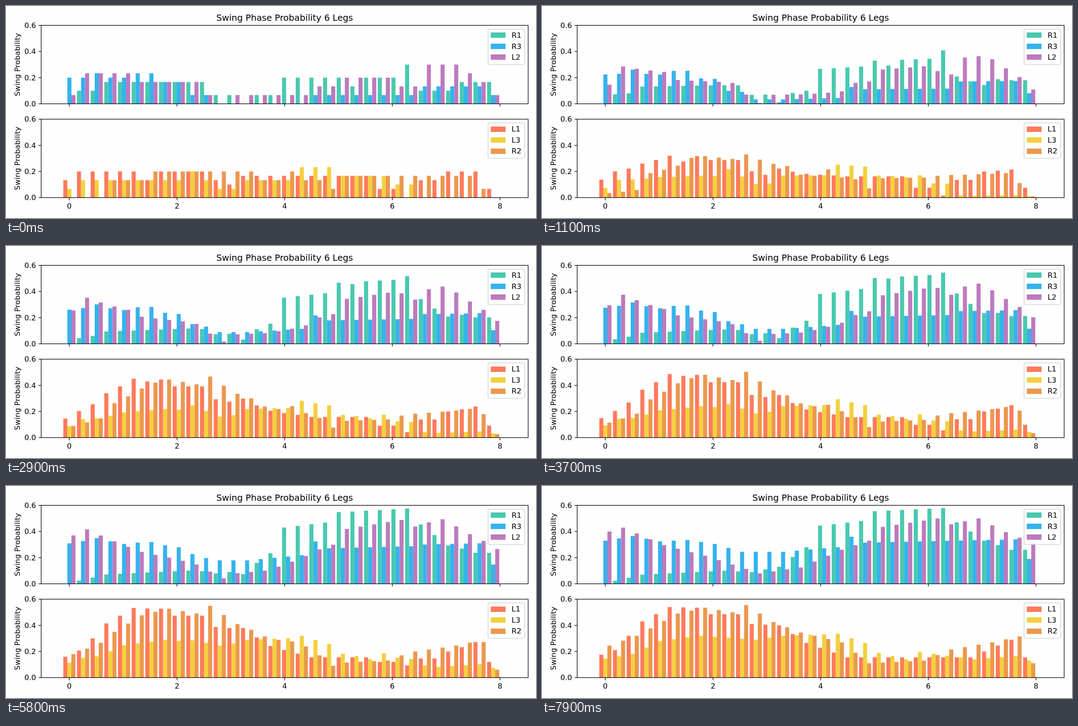
An HTML page with a canvas for the animation above (8 s loop, 1183 by 473 pixels).

```html
<!DOCTYPE html>
<html lang="en">
<head>
<meta charset="utf-8">
<title>Swing Phase Probability</title>
<style>
  html, body { margin: 0; width: 100%; height: 100%; overflow: hidden; background: #fefefe; }
  canvas { display: block; }
</style>
</head>
<body>
<canvas id="stage" width="1183" height="473"></canvas>
<script>
const ctx = document.getElementById('stage').getContext('2d');
const LOOP = 8000, STEP = 100, BINS = 32;
const LEFT = 78.5, RIGHT = 1165.5, HEIGHT = 175, Y_MAX = 0.6;
const ZERO_X = 141.3, UNIT_X = 120.17;
const BAR_X = 127.9, BAR_W = 9.05, GROUP_W = 30.516;
const FONT = '"DejaVu Sans", sans-serif';

// Value of a [bin, value] list at bin i: held until the next point, or linear.
function sample(points, i, linear) {
  const next = points.findIndex(([bin]) => bin > i);
  if (next < 0) return points.at(-1)[1];
  const [b0, v0] = points[next - 1], [b1, v1] = points[next];
  return linear ? v0 + (v1 - v0) * (i - b0) / (b1 - b0) : v0;
}

// Opening levels are counts out of 30 trials, the closing curve is in percent.
function leg(name, color, levels, curve) {
  const bars = Array.from({ length: BINS }, (_, i) => ({
    start: sample(levels, i, false) / 30,
    end: sample(curve, i, true) / 100,
  }));
  return { name, color, bars };
}

const upper = [
  leg('R1', '#48c9b0',
    [[0, 0], [1, 3], [3, 5], [11, 2], [13, 0], [14, 2], [16, 6], [21, 4], [22, 6], [25, 9], [26, 3], [29, 5]],
    [[0, 0], [3, 7], [9, 10], [11, 9], [13, 13], [15, 28], [16, 44.5], [19, 48], [20, 55.5], [25, 58], [26, 47], [28, 33], [30, 26]]),
  leg('R3', '#34b3ee',
    [[0, 6], [2, 7], [3, 6], [5, 7], [7, 5], [9, 2], [11, 0], [18, 2], [26, 4], [31, 2]],
    [[0, 33], [2, 36.5], [4, 32.5], [6, 33.5], [8, 30.5], [10, 24.5], [13, 24.5], [17, 28], [18, 36], [19, 31.5], [30, 34], [31, 19]]),
  leg('L2', '#bc7abd',
    [[0, 2], [1, 7], [5, 5], [10, 2], [11, 0], [12, 2], [18, 4], [20, 6], [24, 4], [26, 9], [29, 7], [30, 5], [31, 2]],
    [[0, 40], [1, 43], [4, 29.5], [7, 21.5], [11, 8], [14, 12.5], [17, 26], [19, 33], [20, 43.5], [24, 50], [25, 45.5], [27, 50], [29, 39.5], [31, 31]]),
];

const lower = [
  leg('L1', '#ff7a5c',
    [[0, 4], [1, 6], [6, 4], [7, 6], [11, 4], [12, 3], [13, 5], [23, 2], [25, 0], [26, 4], [28, 6], [31, 2]],
    [[0, 17.5], [1, 21], [3, 43], [5, 54], [7, 53.5], [8, 48.5], [10, 48.5], [11, 41], [13, 40], [15, 26.5], [18, 15.5], [27, 15.5], [30, 29], [31, 15.5]]),
  leg('L3', '#f4d03f',
    [[0, 2], [1, 4], [9, 6], [10, 4], [11, 2], [13, 4], [17, 7], [20, 5], [24, 3], [26, 0]],
    [[0, 14.5], [2, 18], [4, 28], [7, 32], [11, 29], [13, 32], [17, 33.5], [19, 26.5], [20, 19], [22, 14], [23, 19.5], [27, 14], [30, 16.5], [31, 13]]),
  leg('R2', '#eb984e',
    [[0, 0], [3, 4], [6, 6], [14, 4], [16, 6], [17, 4], [19, 2], [20, 5], [30, 2], [31, 0]],
    [[0, 24.5], [2, 32], [5, 49], [7, 53.5], [9, 50], [10, 55.5], [12, 42.5], [14, 34.5], [17, 27], [19, 11], [23, 13], [25, 21.5], [28, 27], [30, 31.5], [31, 11]]),
];

// Tall and shrinking bars settle early; short ones keep rising to the end.
function barValue({ start, end }, progress) {
  const power = end < start ? 3 : 0.5 + 2.5 * (end / 0.55) ** 2;
  return start + (end - start) * (1 - (1 - progress) ** power);
}

function text(str, x, y, size, align) {
  ctx.font = `${size}px ${FONT}`;
  ctx.textAlign = align;
  ctx.fillStyle = '#000';
  ctx.fillText(str, x, y);
}

function line(x1, y1, x2, y2) {
  ctx.beginPath();
  ctx.moveTo(x1, y1);
  ctx.lineTo(x2, y2);
  ctx.stroke();
}

function drawBars(legs, base, progress) {
  legs.forEach(({ color, bars }, slot) => {
    ctx.fillStyle = color;
    bars.forEach((bar, i) => {
      const height = barValue(bar, progress) / Y_MAX * HEIGHT;
      ctx.fillRect(BAR_X + i * GROUP_W + slot * BAR_W, base - height, BAR_W, height);
    });
  });
}

function drawAxes(top, base, showNumbers) {
  ctx.strokeStyle = '#000';
  ctx.lineWidth = 1.3;
  ctx.strokeRect(LEFT, top, RIGHT - LEFT, HEIGHT);
  for (let i = 0; i < 4; i++) {
    const y = base - i * HEIGHT / 3;
    line(LEFT - 5.8, y, LEFT, y);
    text((i * 0.2).toFixed(1), 67, y + 5.9, 16.43, 'right');
  }
  for (let n = 0; n <= 8; n += 2) {
    const x = ZERO_X + n * UNIT_X;
    line(x, base, x, base + 5.8);
    if (showNumbers) text(n, x, base + 24, 16.43, 'center');
  }
  ctx.save();
  ctx.translate(30.7, top + HEIGHT / 2);
  ctx.rotate(-Math.PI / 2);
  text('Swing Probability', 0, 0, 16.43, 'center');
  ctx.restore();
}

function drawLegend(legs, top) {
  ctx.beginPath();
  ctx.roundRect(1076, top + 8.3, 81.5, 79, 3.3);
  ctx.fillStyle = 'rgba(255,255,255,0.8)';
  ctx.fill();
  ctx.strokeStyle = 'rgba(204,204,204,0.8)';
  ctx.lineWidth = 1.64;
  ctx.stroke();
  legs.forEach(({ name, color }, i) => {
    const y = top + 16 + i * 24.5;
    ctx.fillStyle = color;
    ctx.fillRect(1082, Math.round(y), 33, 12);
    text(name, 1128.5, y + 11.8, 16.43, 'left');
  });
}

function drawPanel(legs, top, showNumbers, progress) {
  const base = top + HEIGHT;
  drawBars(legs, base, progress);
  drawAxes(top, base, showNumbers);
  drawLegend(legs, top);
}

function draw(now) {
  const time = Math.floor(now % LOOP / STEP) * STEP;
  const progress = time / (LOOP - STEP);

  ctx.fillStyle = '#fefefe';
  ctx.fillRect(0, 0, 1183, 473);
  drawPanel(upper, 43.2, false, progress);
  drawPanel(lower, 252.5, true, progress);
  text('Swing Phase Probability 6 Legs', 622, 33.2, 19.72, 'center');
  requestAnimationFrame(draw);
}

requestAnimationFrame(draw);
</script>
</body>
</html>
```
